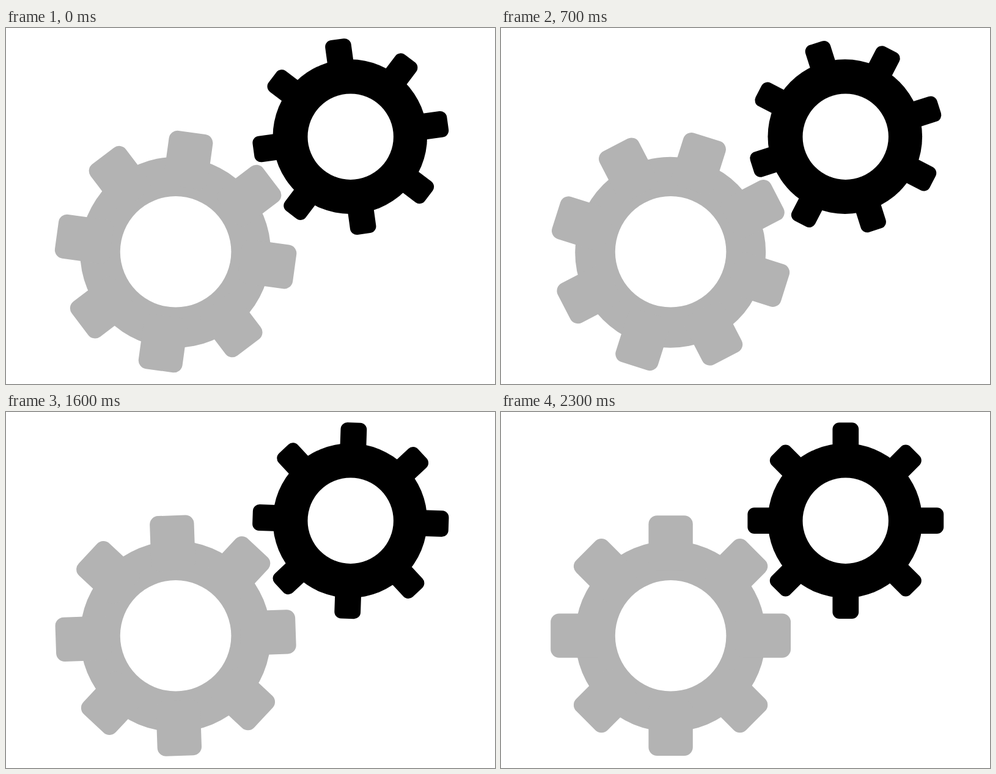
These frames come from a looping animation (800 px wide and 582 px high, 2.4 s). An HTML page:

```html
<!DOCTYPE html>
<html lang="en">
<head>
<meta charset="utf-8">
<title>Gears</title>
<style>
  html, body { margin: 0; width: 100%; height: 100%; overflow: hidden; background: #fff; }
  svg { display: block; width: 800px; height: 582px; }
</style>
</head>
<body>
<svg id="stage" viewBox="0 0 800 582"></svg>
<script>
const TEETH = 8, FRAMES = 24, FRAME_MS = 100;
const stage = document.getElementById('stage');

function add(parent, tag, attrs) {
  const el = document.createElementNS('http://www.w3.org/2000/svg', tag);
  for (const key in attrs) el.setAttribute(key, attrs[key]);
  return parent.appendChild(el);
}

// The disc and hole stay still; only the teeth turn.
function makeGear({ x, y, fill, disc, hole, reach, width, corner, dir }) {
  const gear = add(stage, 'g', { fill });
  add(gear, 'circle', disc);
  const teeth = add(gear, 'g', {});
  const root = hole.r + 15;
  for (let i = 0; i < TEETH; i++) {
    add(teeth, 'rect', {
      x: -width / 2, y: -reach, width, height: reach - root, rx: corner,
      transform: `rotate(${i * 360 / TEETH})`
    });
  }
  add(gear, 'circle', { ...hole, fill: '#fff' });
  return angle => teeth.setAttribute('transform', `translate(${x} ${y}) rotate(${dir * angle})`);
}

const gears = [
  makeGear({
    x: 277.6, y: 365.6, fill: '#b3b3b3', dir: 1,
    disc: { cx: 277.2, cy: 366.8, r: 156 },
    hole: { cx: 277.6, cy: 365.8, r: 90.8 },
    reach: 196.4, width: 72.4, corner: 14
  }),
  makeGear({
    x: 563.8, y: 177.6, fill: '#000', dir: -1,
    disc: { cx: 562.8, cy: 177.6, r: 126.3 },
    hole: { cx: 563.7, cy: 177.7, r: 70.2 },
    reach: 160.4, width: 42.8, corner: 11
  })
];

// Half a turn in equal steps, with both end poses included.
function draw(time) {
  const step = (Math.floor(time / FRAME_MS) + 1) % FRAMES;
  const angle = step * 180 / (FRAMES - 1);
  gears.forEach(turn => turn(angle));
}

const start = performance.now();
function tick() {
  draw(performance.now() - start);
  requestAnimationFrame(tick);
}
tick();
</script>
</body>
</html>
```
